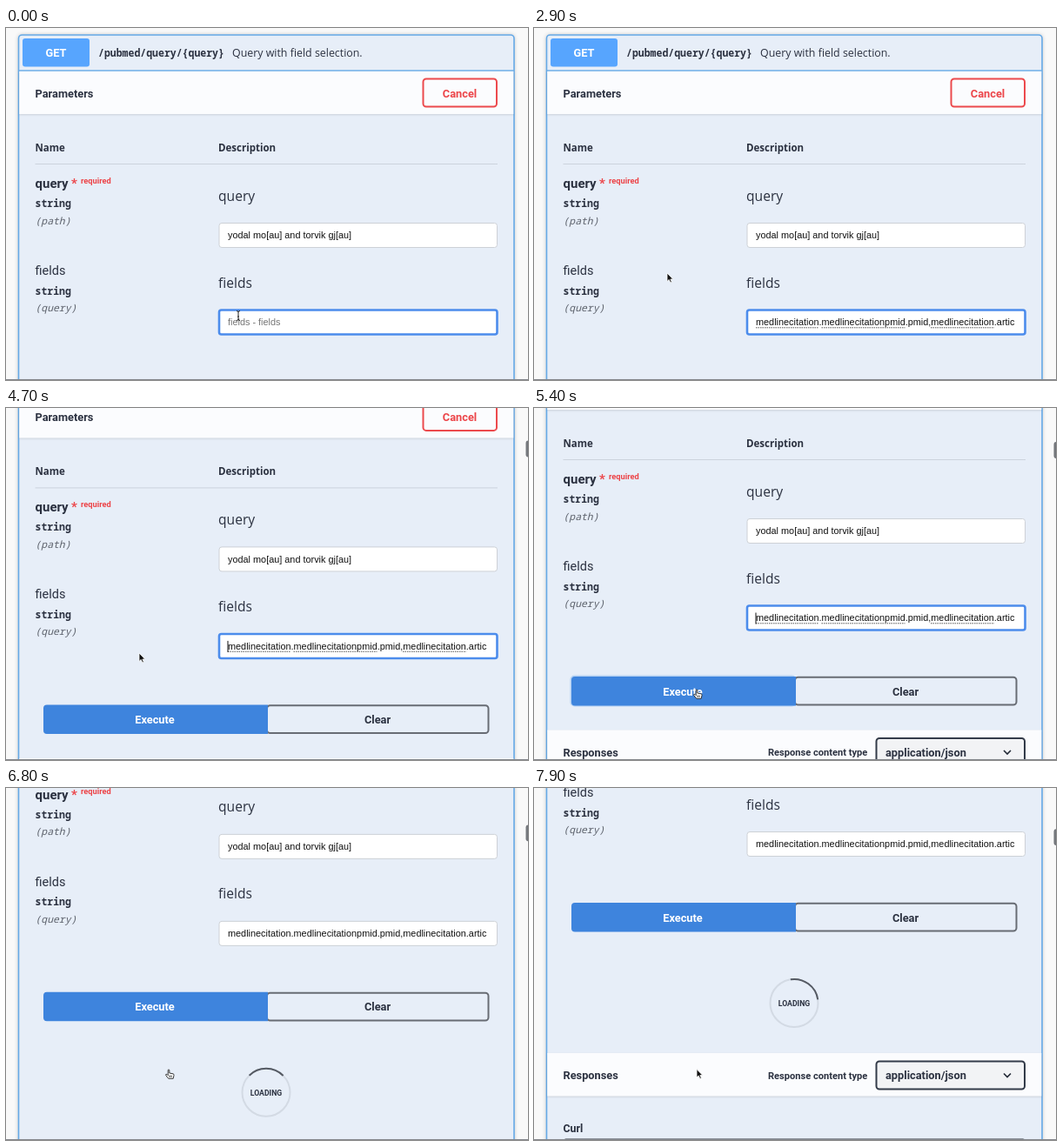
Animation of 600 by 405 pixels, one loop 8000 ms. Source, as an HTML page:

```html
<!DOCTYPE html>
<html lang="en">
<head>
<meta charset="utf-8">
<title>Query form</title>
<style>
html, body { margin: 0; width: 100%; height: 100%; overflow: hidden; background: #f9f9f9; }
svg { display: block; width: 600px; height: 405px; }
text { font: 700 12.8px Roboto, sans-serif; fill: #2b3140; white-space: pre; }
.mid { text-anchor: middle; }
.white { fill: #fff; }
.red { fill: #ec4549; }
.sans { font: 400 12.4px "Open Sans", sans-serif; }
.th { font: 700 11.5px "Open Sans", sans-serif; }
.head { font: 400 15.6px "Open Sans", sans-serif; }
.mono { font: 600 11.5px "Noto Sans Mono", monospace; }
.in { font: italic 400 11.4px "Noto Sans Mono", monospace; fill: #5d626c; }
.value { font: 400 10.88px "Liberation Sans", Arial, sans-serif; fill: #111; }
.box { fill: #fff; stroke: #cdd1d6; }
.bar { fill: #fbfcfe; filter: drop-shadow(0 1px 1px rgba(0, 0, 0, .12)); }
</style>
</head>
<body>
<svg viewBox="0 0 600 405">
  <g id="page">
    <rect x="14.5" y="8" width="569.5" height="1000" rx="4" fill="#e7eef8" stroke="#65a9e6" stroke-width="1.6"
      style="filter:drop-shadow(0 0 2px rgba(0,0,0,.19))"/>
    <rect class="bar" x="15.3" y="50" width="568" height="49"/>
    <path d="M15 49H584" stroke="#72b0e8" stroke-width="1.4"/>
    <rect x="19" y="12" width="77" height="32.5" rx="3" fill="#57a5fe"/>
    <text class="mid white" x="57.5" y="33">GET</text>
    <text class="mono" x="106" y="33">/pubmed/query/{query}</text>
    <text class="sans" x="260" y="33">Query with field selection.</text>
    <text x="33.5" y="80">Parameters</text>
    <rect x="479.5" y="58.5" width="84.5" height="32" rx="3.5" fill="none" stroke="#ec4a4d" stroke-width="2"/>
    <text class="mid red" x="521.5" y="80">Cancel</text>

    <text class="th" x="33.5" y="141.5">Name</text>
    <text class="th" x="244" y="141.5">Description</text>
    <path d="M33.5 156.5H565" stroke="#ccd3dd"/>

    <text x="33.5" y="184" style="font-size:15px">query</text>
    <text class="red" x="75" y="184" style="font-size:15px">*</text>
    <text class="red" x="86" y="178.5" style="font-size:9.3px">required</text>
    <text class="mono" x="33.5" y="206">string</text>
    <text class="in" x="33.5" y="225.5">(path)</text>
    <text class="head" x="244" y="198.5">query</text>
    <rect class="box" x="245" y="224.5" width="319.5" height="28" rx="3"/>
    <text class="value" x="255" y="242.3">yodal mo[au] and torvik gj[au]</text>

    <text x="33.5" y="284" style="font-size:14.5px;font-weight:400">fields</text>
    <text class="mono" x="33.5" y="306.5">string</text>
    <text class="in" x="33.5" y="326">(query)</text>
    <text class="head" x="244" y="298.5">fields</text>
    <rect class="box" x="245" y="324.5" width="319.5" height="28" rx="3"/>
    <rect id="focus" x="245" y="324.5" width="319.5" height="28" rx="2.5" fill="none" stroke="#4c8cec" stroke-width="2.6"/>
    <text id="hint" class="value" x="255" y="342.3" style="fill:#757575">fields - fields</text>
    <text id="value" class="value" x="255" y="342.3">medlinecitation.medlinecitationpmid.pmid,medlinecitation.artic</text>
    <path id="spell" d="M255 344.8h72.5M330.5 344.8h96M456 344.8h73" stroke="#555" stroke-dasharray="1.5 1"/>
    <path id="caret" d="M255 332.5v13" stroke="#111"/>

    <rect id="halo" x="41.5" y="404.5" width="260" height="36" rx="5" fill="#b5d2f3"/>
    <rect x="300" y="406.8" width="254.5" height="31.8" rx="3.5" fill="#e7eef8" stroke="#686c74" stroke-width="2"/>
    <path d="M301 406H47a4 4 0 0 0-4 4v25.500a4 4 0 0 0 4 4H301z" fill="#3e84dd"/>
    <text class="mid white" x="171" y="427.500">Execute</text>
    <text class="mid" x="427" y="427.500">Clear</text>

    <g id="loading" fill="none" stroke-width="2">
      <circle cx="299" cy="521.5" r="27.500" stroke="#d3dae4"/>
      <path id="arc" d="M279.5 502A27.500 27.500 0 0 1 318.5 502" stroke="#555a63"/>
      <text id="label" class="mid" x="299" y="524.700" style="font-size:8.7px">LOADING</text>
    </g>

    <g id="responses">
      <rect class="bar" x="15.3" y="579" width="568" height="49.500"/>
      <text x="33.5" y="609">Responses</text>
      <text x="269" y="608.500" style="font-size:11.1px">Response content type</text>
      <rect x="393.5" y="588.500" width="170.5" height="32" rx="3.5" fill="#f2f3f5" stroke="#333b49" stroke-width="2"/>
      <text x="404" y="609">application/json</text>
      <path d="M540 602.500l4 4 4-4" fill="none" stroke="#222936" stroke-width="1.6"/>
      <text x="33.5" y="669.500" style="font-size:12.4px">Curl</text>
      <rect x="33.5" y="677.500" width="531.5" height="60" rx="3" fill="#333941"/>
    </g>
  </g>
  <rect id="thumb" x="597.500" width="6" height="19" rx="3" fill="#74777c"/>
  <path d="M0 404.500H600" stroke="#85888d"/>
  <path id="beam" d="M-2-5.500q2 0 2 1.500q0-1.500 2-1.500M0-4V4M-2 5.500q2 0 2-1.500q0 1.500 2 1.500M-1 1h2" fill="none" stroke="#222"/>
  <path id="arrow" d="M0 0V9.500L2.200 7.500 3.800 11 5.400 10.300 3.900 7H6.800z" fill="#111" stroke="#fff" stroke-width=".8"/>
  <path id="hand" d="M-.8 1Q0-.5.800 1V4.500L5 5.300Q6.300 5.600 6 7L5.200 10.800H-.3L-3.500 6.700Q-3.400 5.300-2 6L-.8 7.200zM1 9.500V7M3 9.500V7" fill="#fff" stroke="#222" stroke-width=".9"/>
</svg>
<script>
const LOOP = 8000, PASTE = 300, CLICK = 5450;
const $ = id => document.getElementById(id);
const show = (id, on) => { $(id).style.display = on ? '' : 'none'; };
const move = (id, x, y) => $(id).setAttribute('transform', `translate(${x} ${y})`);
const ease = p => p * p * (3 - 2 * p);
const linear = p => p;

// keys: rows of [time, value]
function track(keys, t, curve) {
  const i = keys.findIndex(k => k[0] > t);
  if (i === 0) return keys[0][1];
  if (i < 0) return keys[keys.length - 1][1];
  const [t0, a] = keys[i - 1], [t1, b] = keys[i];
  return a + (b - a) * curve((t - t0) / (t1 - t0));
}

const scroll = [[3600, 0], [3900, 20], [4700, 64.5], [5200, 97], [6500, 97], [6800, 171], [7200, 226], [7700, 274]];
const mouseX = [[700, 267], [2400, 153], [4750, 153], [5300, 187]];
const mouseY = [[700, 331], [2400, 282], [4750, 282], [5300, 323.5]];

function draw(t) {
  const top = track(scroll, t, linear);
  const x = track(mouseX, t, ease), y = track(mouseY, t, ease);
  const clicked = t >= CLICK;

  move('page', 0, -top);
  move('thumb', 0, 34.5 + top * .046);
  show('thumb', t >= 3700);

  show('hint', t < PASTE);
  show('value', t >= PASTE);
  show('spell', t >= PASTE && !clicked);
  show('focus', !clicked);
  show('caret', t >= 4300 && !clicked);
  show('halo', t >= 5350 && t < 6200);

  show('loading', clicked);
  $('label').style.opacity = Math.min(1, (t - CLICK) / 500);
  $('arc').setAttribute('transform', `rotate(${(t - 6800) * .36} 299 521.5)`);
  move('responses', 0, clicked ? 0 : -111.5);

  const cursor = x > 245 && y > 324 ? 'beam' : t >= 5150 && t < 7700 ? 'hand' : 'arrow';
  for (const id of ['beam', 'arrow', 'hand']) show(id, id === cursor);
  move(cursor, x, y);
}

function tick() {
  draw(performance.now() % LOOP);
  requestAnimationFrame(tick);
}
tick();
</script>
</body>
</html>
```
